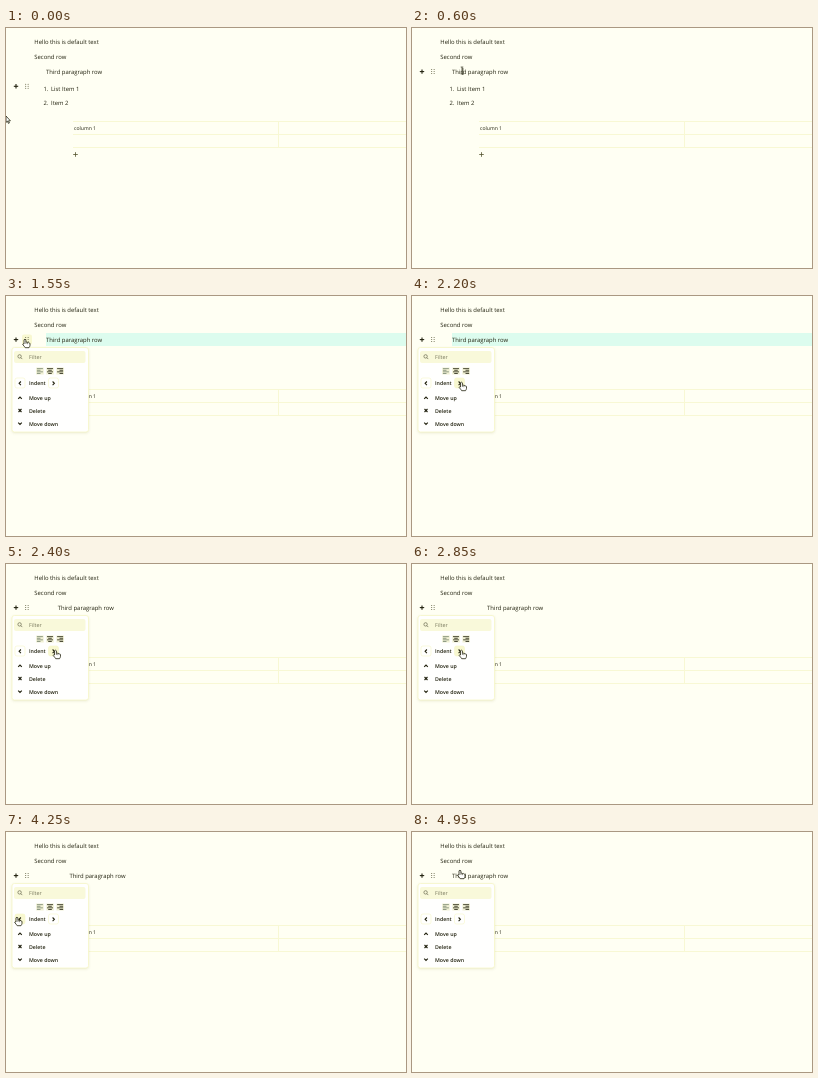
Animation of 400x240 px, one loop 5 s. Source, as an HTML page with a canvas:

```html
<!DOCTYPE html>
<html lang="en">
<head>
<meta charset="utf-8">
<title>Block indent</title>
<style>
html, body { margin: 0; width: 100%; height: 100%; overflow: hidden; background: #fffff3; }
canvas { display: block; width: 400px; height: 240px; }
</style>
</head>
<body>
<canvas id="stage" width="400" height="240"></canvas>
<script>
const ctx = document.getElementById('stage').getContext('2d');
const LOOP = 5000, STEP = 50;
const PAPER = '#fffff3', PANEL = '#fffffe', INK = '#22220f';
const LINE = '#f8f8d4', BORDER = '#f6f6c8', HOVER = '#f8f8d0';
const INDENT = 11.7;
const OPEN_AT = 1300;
const INDENT_CLICKS = [2300, 2500, 2700, 3000];
const OUTDENT_CLICKS = [4000, 4200, 4400, 4600];

// Pointer tip: [time, x, y]
const POINTER = [
  [0, 0, 88], [500, 50, 42], [650, 50, 42], [1050, 19, 43], [1650, 19, 43],
  [2150, 49.5, 86], [3300, 49.5, 86], [3850, 11, 85], [4700, 11, 85], [4950, 48, 38]
];

const ease = p => p * p * (3 - 2 * p);
const countPast = (times, t) => times.filter(c => t >= c).length;

function pointerAt(t) {
  const i = POINTER.findIndex(p => p[0] > t);
  if (i < 0) return POINTER[POINTER.length - 1].slice(1);
  const [t0, x0, y0] = POINTER[i - 1], [t1, x1, y1] = POINTER[i];
  const p = ease((t - t0) / (t1 - t0));
  return [x0 + (x1 - x0) * p, y0 + (y1 - y0) * p];
}

function rect(x, y, w, h, fill, radius = 0) {
  ctx.fillStyle = fill;
  ctx.beginPath();
  ctx.roundRect(x, y, w, h, radius);
  ctx.fill();
}

function outline(color, width) {
  ctx.strokeStyle = color;
  ctx.lineWidth = width;
  ctx.stroke();
}

function text(str, x, y, size = 5.9, color = INK, weight = 400) {
  ctx.font = `${weight} ${size}px "Open Sans", "Noto Sans", sans-serif`;
  ctx.fillStyle = color;
  ctx.fillText(str, x, y);
}

function stroke(points, color = INK, width = 1) {
  ctx.beginPath();
  points.forEach(([x, y], i) => i ? ctx.lineTo(x, y) : ctx.moveTo(x, y));
  outline(color, width);
}

function plus(x, y, r, color = INK, width = 1) {
  stroke([[x - r, y], [x + r, y]], color, width);
  stroke([[x, y - r], [x, y + r]], color, width);
}

function chevron(x, y, angle) {
  ctx.save();
  ctx.translate(x, y);
  ctx.rotate(angle);
  stroke([[-1.8, 0.9], [0, -0.9], [1.8, 0.9]], INK, 1.1);
  ctx.restore();
}

function drawDocument(t) {
  const level = countPast(INDENT_CLICKS, t) - countPast(OUTDENT_CLICKS, t);
  if (t >= OPEN_AT && t < INDENT_CLICKS[0]) rect(40, 37, 360, 13, '#dcfcee');
  text('Hello this is default text', 28.3, 16);
  text('Second row', 28.3, 31);
  text('Third paragraph row', 40 + level * INDENT, 45.8);
  if (t >= 600 && t < OPEN_AT) rect(50.5, 40, 0.8, 7, INK);
  text('1.', 37.5, 62.8);
  text('List Item 1', 45, 62.8);
  text('2.', 37.5, 77.2);
  text('Item 2', 45, 77.2);

  for (const y of [93.5, 106.5, 119.5]) stroke([[67, y], [400, y]], LINE);
  stroke([[272.5, 93], [272.5, 120]], LINE);
  text('column 1', 68, 102, 5.1);
  plus(69.5, 126.5, 2.3, '#55552f', 0.8);
}

function drawToolbar(y, hovered) {
  plus(10, y, 2.2, INK, 1.1);
  if (hovered) rect(16, y - 5, 10, 10, HOVER, 2);
  for (const dx of [-1.2, 1.2])
    for (const dy of [-2, 0, 2]) rect(20.9 + dx - 0.5, y + dy - 0.5, 1, 1, '#5a5a3c', 0.5);
}

function drawTooltip() {
  rect(4, 52.5, 34, 10, '#20200f', 2.5);
  text('Click to tune', 7.8, 59.2, 4.6, '#eeeed8');
}

function drawAlignIcon(x, align, color) {
  rect(x - 0.5, 71.5, 7.5, 7, '#f1f1d4');
  [6, 3.6, 6, 3.6].forEach((w, i) =>
    rect(x + 0.2 + (6 - w) * align, 72.2 + i * 1.6, w, 0.9, color));
}

function drawPopover(t, mx, my) {
  ctx.save();
  ctx.globalAlpha = Math.min(1, (t - OPEN_AT + STEP) / 100);
  ctx.shadowColor = 'rgba(110,110,20,.16)';
  ctx.shadowBlur = 3;
  ctx.shadowOffsetY = 1;
  rect(6, 51.5, 76.5, 84.5, PANEL, 2.5);
  ctx.shadowColor = 'transparent';
  outline(BORDER, 0.8);

  rect(8, 55, 71.5, 12, '#f9f9da', 2);
  ctx.beginPath();
  ctx.arc(13.6, 60.4, 1.7, 0, Math.PI * 2);
  outline('#77775c', 0.8);
  stroke([[14.8, 61.6], [16.3, 63.1]], '#77775c', 0.8);
  text('Filter', 23, 63, 5.4, '#77775c');

  drawAlignIcon(30.7, 0, '#86937c');
  drawAlignIcon(40.8, 0.5, '#3d3d28');
  drawAlignIcon(50.9, 1, '#3d3d28');

  for (const x of [14, 47.5]) {
    const hovered = Math.abs(mx - x) < 5 && Math.abs(my - 87) < 5;
    rect(x - 5, 82, 10, 10, hovered ? HOVER : PANEL, 2);
    outline(BORDER, 0.6);
  }
  chevron(14, 87.3, -Math.PI / 2);
  chevron(47.5, 87.3, Math.PI / 2);
  const label = (str, y) => text(str, 23, y, 5.25, INK, 600);
  label('Indent', 89.3);
  chevron(14, 102, 0);
  label('Move up', 103.9);
  stroke([[12.5, 113], [15.5, 116]], INK, 1.1);
  stroke([[15.5, 113], [12.5, 116]], INK, 1.1);
  label('Delete', 116.5);
  chevron(14, 127.5, Math.PI);
  label('Move down', 129.5);
  ctx.restore();
}

function drawShape(x, y, path) {
  ctx.save();
  ctx.translate(x, y);
  const shape = new Path2D(path);
  ctx.fillStyle = PANEL;
  ctx.strokeStyle = INK;
  ctx.lineWidth = 0.8;
  ctx.fill(shape);
  ctx.stroke(shape);
  ctx.restore();
}

function drawPointer(t, x, y) {
  if (t >= 1000) {
    drawShape(x, y, 'M-1 .8Q0-.4 .9 .8V3.3Q1.9 2.7 2.4 3.6Q3.4 3 3.8 4Q4.9 3.7 5 4.8V6.3Q4.8 7.8 4 8.7H.2Q-.6 7.4-2.3 5.5Q-2.2 4.4-1 5Z');
    stroke([[x + 0.9, y + 3.3], [x + 0.9, y + 5]], INK, 0.5);
    stroke([[x + 2.4, y + 3.6], [x + 2.4, y + 5.2]], INK, 0.5);
  } else if (x > 28 && y < 50) {
    stroke([[x, y - 3], [x, y + 4]], INK, 0.7);
    stroke([[x - 1.3, y - 3], [x + 1.3, y - 3]], INK, 0.6);
    stroke([[x - 1.3, y + 4], [x + 1.3, y + 4]], INK, 0.6);
  } else {
    drawShape(x, y, 'M0 0V6.4L1.4 5.1L2.4 7.4L3.4 7L2.5 4.8H4.4Z');
  }
}

function draw(t) {
  const [mx, my] = pointerAt(t);
  ctx.textRendering = 'geometricPrecision';
  rect(0, 0, 400, 240, PAPER);
  drawDocument(t);
  const overTune = t >= 1000 && Math.abs(mx - 20) < 5 && Math.abs(my - 43) < 5;
  drawToolbar(t < 350 ? 58.3 : 43.6, overTune);
  if (t >= 1100 && t < OPEN_AT) drawTooltip();
  if (t >= OPEN_AT) drawPopover(t, mx, my);
  drawPointer(t, mx, my);
}

const start = performance.now();
function tick() {
  const t = (performance.now() - start) % LOOP;
  draw(Math.floor(t / STEP) * STEP);
  requestAnimationFrame(tick);
}
tick();
</script>
</body>
</html>
```
